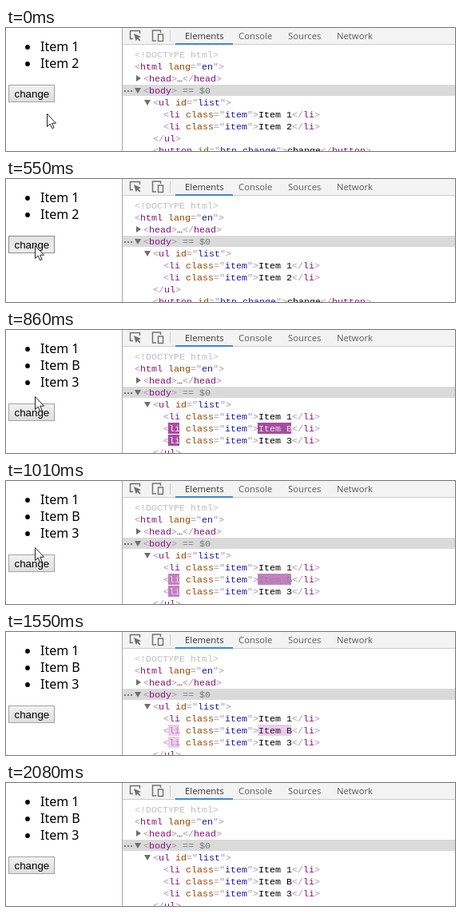
These frames come from a looping animation (562x154 px, 2160 ms). An HTML page with a canvas:

```html
<!DOCTYPE html>
<html lang="en">
<head>
<meta charset="utf-8">
<title>List update in the element inspector</title>
<style>
html, body { margin: 0; width: 100%; height: 100%; overflow: hidden; background: #fff; }
canvas { display: block; }
</style>
</head>
<body>
<canvas id="stage" width="562" height="154"></canvas>
<script>
const ctx = document.getElementById('stage').getContext('2d');
const LOOP = 2160, PRESS = 550, UPDATE = 780;
const CHAR = 7, ROW = 15, FIRST_BASELINE = 37;
const MONO = '11.667px "Liberation Mono", monospace';
const COLORS = { mark: '#a894a6', tag: '#881280', attr: '#994500', value: '#1a1aa6', text: '#000' };

// time, x, y of the pointer tip; no position means it has left
const pointerPath = [
  [0, 51, 107], [80, 48, 102], [150, 43, 94], [230, 40, 88], [300, 38, 85],
  [380, 36, 83], [1090, 41, 100], [1160, 50, 133], [1240]
];

// time, highlight fill, tag name colour, changed text colour
const flashes = [
  [0], [780, '#9e3699', '#fff', '#fff'], [860, '#a84ba3', '#fbf3fb', '#e2e2e2'],
  [940, '#b767b3', '#f3e0f2', '#b8b0b8'], [1010, '#c57fc1', '#ead0e9', '#9b819a'],
  [1090, '#ce93cb', '#dfb9dd', '#806b80'], [1160, '#d5a1d2', '#d4a6d2', '#6b506b'],
  [1240, '#dbaed9', '#c997c7', '#553d55'], [1390, '#ebcde9', '#bf80bb', '#382c38'],
  [1550, '#ebcde9', '#bf80bb', '#241c24'], [1930, '#f6e4f5', '#9c3d96', '#080608'], [2080]
];

const latest = (steps, t) => steps.filter(step => step[0] <= t).pop();

function rect(x, y, w, h, fill) {
  ctx.fillStyle = fill;
  ctx.fillRect(x, y, w, h);
}

function text(str, x, y, font, fill) {
  ctx.font = font;
  ctx.fillStyle = fill;
  ctx.fillText(str, x, y);
}

function polygon(points, fill) {
  ctx.beginPath();
  points.forEach(([x, y]) => ctx.lineTo(x, y));
  ctx.closePath();
  ctx.fillStyle = fill;
  ctx.fill();
}

function outline(x, y, w, h, color) {
  ctx.strokeStyle = color;
  ctx.lineWidth = 1;
  ctx.strokeRect(x + .5, y + .5, w - 1, h - 1);
}

const baseline = row => FIRST_BASELINE + row * ROW;
const mono = (str, x, row, fill) => text(str, x, baseline(row), MONO, fill);

function markup(source, x, row) {
  let inTag = false, inQuote = false, afterName = false;
  for (const { 0: token, index } of source.matchAll(/<\/?|>|=|"|\s+|[^<>="\s]+/g)) {
    let kind = 'mark';
    if (token[0] === '<') {
      inTag = true;
      afterName = false;
    } else if (token === '>') {
      inTag = false;
    } else if (token === '"') {
      inQuote = !inQuote;
    } else if (token !== '=' && token.trim()) {
      kind = !inTag ? 'text' : inQuote ? 'value' : afterName ? 'attr' : 'tag';
      afterName = true;
    }
    mono(token, x + index * CHAR, row, COLORS[kind]);
  }
}

function arrow(x, row, open) {
  const y = baseline(row) - 4;
  polygon(open ? [[x, y - 3], [x + 8, y - 3], [x + 4, y + 4]]
               : [[x + 1, y - 4], [x + 7, y], [x + 1, y + 4]], '#6e6e6e');
}

function drawPage(updated, hovered, pressed) {
  const items = updated ? ['Item 1', 'Item B', 'Item 3'] : ['Item 1', 'Item 2'];
  items.forEach((item, i) => {
    ctx.fillStyle = '#000';
    ctx.beginPath();
    ctx.arc(27, 24 + i * 21, 2.9, 0, Math.PI * 2);
    ctx.fill();
    text(item, 43, 29 + i * 21, '16px "Noto Sans", sans-serif', '#000');
  });

  const y = updated ? 92 : 71;
  const fill = ctx.createLinearGradient(0, y, 0, y + 22);
  fill.addColorStop(0, pressed ? '#e2e2e2' : hovered ? '#f6f6f6' : '#f2f2f2');
  fill.addColorStop(1, pressed ? '#efefef' : hovered ? '#e2e2e2' : '#dddddd');
  rect(3, y, 58, 22, fill);
  outline(3, y, 58, 22, pressed ? '#8c8c8c' : '#a2a2a2');
  text('change', 10.5, y + 16, '13.333px "Liberation Sans", sans-serif', '#000');
}

function drawToolbar() {
  rect(146, 0, 416, 20, '#f3f3f3');
  rect(146, 20, 416, 1, '#cccccc');
  rect(212, 19, 72, 2, '#4285d9');
  rect(205, 3, 1, 14, '#cccccc');

  ctx.strokeStyle = '#6e6e6e';
  ctx.lineWidth = 1.4;
  ctx.beginPath();
  ctx.moveTo(159, 13.5);
  ctx.lineTo(155.5, 13.5);
  ctx.lineTo(155.5, 3.5);
  ctx.lineTo(167.5, 3.5);
  ctx.lineTo(167.5, 7);
  ctx.stroke();
  polygon([[160, 7], [169, 11], [165.5, 12.2], [168.5, 15.3], [167.2, 16.5], [164.2, 13.5], [162.8, 16.5]], '#6e6e6e');

  ctx.strokeRect(183.5, 3, 10, 13);
  rect(188, 6, 10, 12, '#f3f3f3');
  ctx.strokeRect(190.5, 8, 6, 8.5);

  [['Elements', 224], ['Console', 291], ['Sources', 353], ['Network', 414]].forEach(([name, x], i) =>
    text(name, x, 14, '11.3px "Open Sans", sans-serif', i ? '#5a5a5a' : '#333'));
}

function drawTree(updated) {
  rect(146, 71, 416, 14, '#dadada');
  mono('<!DOCTYPE html>', 161, 0, '#c0c0c0');
  markup('<html lang="en">', 161, 1);
  arrow(162, 2, false);
  markup('<head>…</head>', 172, 2);
  [148, 152, 156].forEach(x => rect(x, 78, 2, 2, '#777'));
  arrow(161, 3, true);
  markup('<body>', 172, 3);
  mono('==', 221, 3, '#777');
  mono('$0', 242, 3, '#777');
  arrow(173, 4, true);
  markup('<ul id="list">', 184, 4);
  const items = updated ? ['Item 1', 'Item B', 'Item 3'] : ['Item 1', 'Item 2'];
  items.forEach((item, i) => markup(`<li class="item">${item}</li>`, 197, 5 + i));
  markup('</ul>', 184, 5 + items.length);
  markup('<button id="btn-change">change</button>', 184, 6 + items.length);
}

function drawFlash([, fill, tagColor, textColor]) {
  if (!fill) return;
  const mark = (str, x, row, w, color) => {
    rect(x - 1, baseline(row) - 11, w, 14, fill);
    mono(str, x, row, color);
  };
  mark('li', 204, 6, 14, tagColor);
  mark('li', 204, 7, 14, tagColor);
  mark('Item B', 316, 6, 42, textColor);
}

function drawPointer([, x, y]) {
  if (x === undefined) return;
  const shape = [[0, 0], [0, 16], [3.7, 12.6], [6.2, 18.2], [8.6, 17.2], [6.2, 11.7], [11, 11.7]];
  polygon(shape.map(([dx, dy]) => [x + .5 + dx, y + .5 + dy]), '#fff');
  ctx.strokeStyle = '#222';
  ctx.lineWidth = 1;
  ctx.stroke();
}

function draw(t) {
  const updated = t >= UPDATE;
  rect(0, 0, 562, 154, '#fff');
  drawPage(updated, t >= 230 && !updated, t >= PRESS && !updated);
  rect(145, 0, 1, 154, '#a8a8a8');
  drawToolbar();
  drawTree(updated);
  drawFlash(latest(flashes, t));
  drawPointer(latest(pointerPath, t));
}

const start = performance.now();
function tick() {
  draw((performance.now() - start) % LOOP);
  requestAnimationFrame(tick);
}
tick();
</script>
</body>
</html>
```
